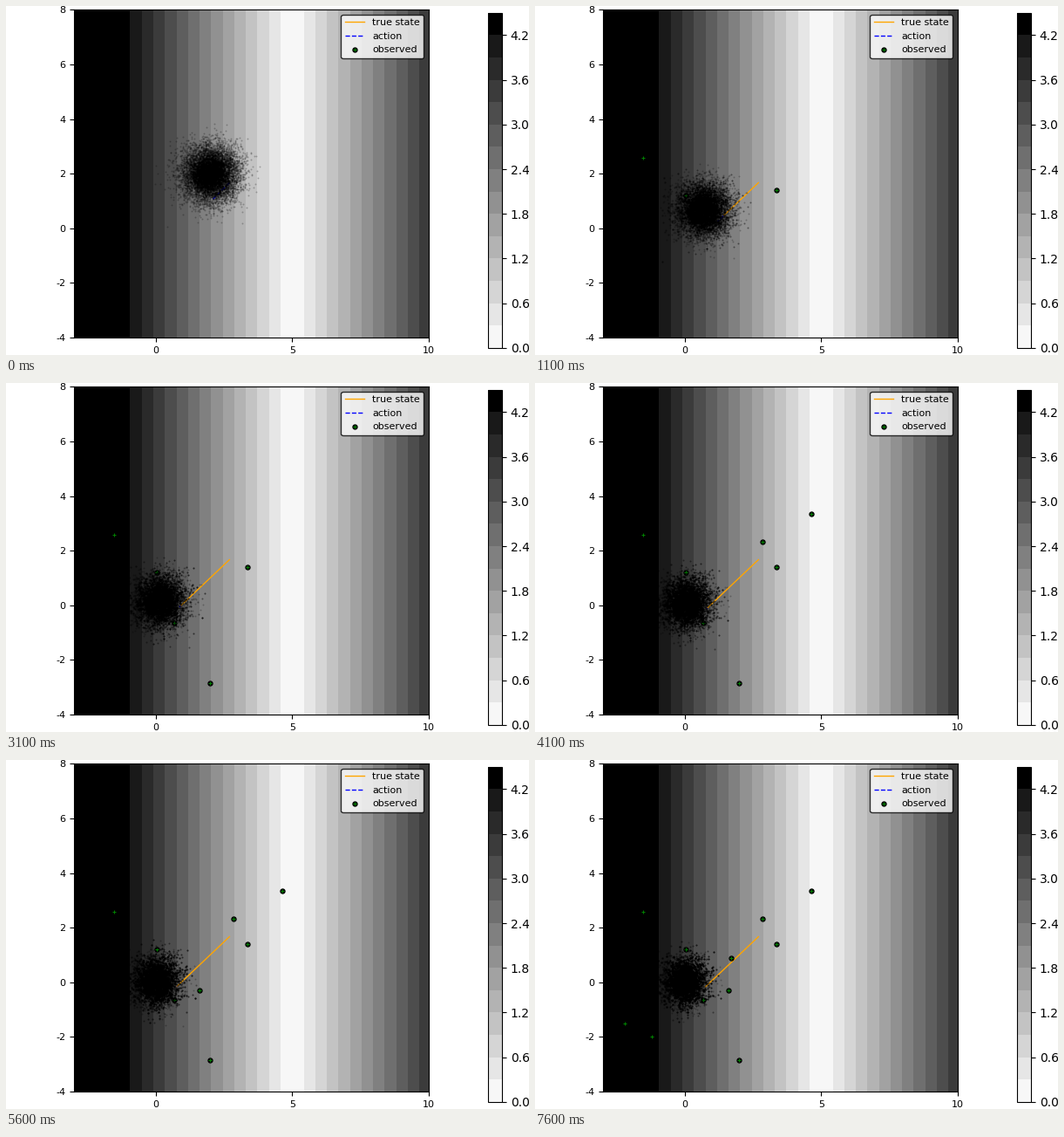
Write a matplotlib script that moves like this. It is 600 px wide and 400 px high and loops after 8000 ms.

```python
import numpy as np
import matplotlib.pyplot as plt
from matplotlib.animation import FuncAnimation

W, H, DPI = 600, 400, 100
INTERVAL, FRAMES = 100, 80
STEPS = 17
N = 10000
DECAY = 0.7

# Measurements outside the cloud, in order of arrival
OBSERVED = np.array([
    (3.37, 1.40), (-1.53, 2.58), (0.04, 1.20), (0.67, -0.65),
    (1.99, -2.86), (2.85, 2.33), (4.65, 3.34), (1.60, -0.30),
    (-1.20, -2.00), (1.70, 0.89), (-2.20, -1.50),
])


def place(left, top, right, bottom):
    """Axes rectangle from pixel edges measured from the top left."""
    return [left / W, 1 - bottom / H, (right - left) / W, (bottom - top) / H]


def particle_clouds():
    """Particles shrink toward the origin and are partly resampled each step."""
    rng = np.random.default_rng(4)
    base = rng.normal(size=(N, 2))
    clouds = []
    for n in range(STEPS):
        spread = 0.5 - n / STEPS * np.array([0.12, 0.07])
        clouds.append(2 * DECAY ** n + base * spread)
        swap = rng.random(N) < 0.12
        base[swap] = base[rng.integers(0, N, swap.sum())]
    return clouds


def seen_count(step):
    """Measurements arrive every step at first, later ones often fall in the cloud."""
    return int(np.interp(step, [0, 4, 9, 16], [0, 4, 7, 11]))


pull = 1 - DECAY ** np.arange(STEPS)
path = np.array([2.70, 1.67]) - np.outer(pull, [1.95, 1.84])
clouds = particle_clouds()

fig = plt.figure(figsize=(W / DPI, H / DPI), dpi=DPI, facecolor="white")
ax = fig.add_axes(place(78, 4.3, 484.7, 380.1))
cax = fig.add_axes(place(553, 7.9, 569, 391.7))

# Measurement noise grows with the distance from x = 5
levels = np.linspace(0, 4.5, 16)
greys = [str(1 - (i + 0.5) / 15) for i in range(14)] + ["black"]
gx, gy = np.meshgrid(np.linspace(-3, 10, 131), [-4, 8])
noise = np.minimum(np.abs(gx - 5) / np.sqrt(2), 4.49)
bands = ax.contourf(gx, gy, noise, levels=levels, colors=greys)
bar = fig.colorbar(bands, cax=cax, ticks=np.arange(0, 4.5, 0.6), format="%.1f")
bar.ax.tick_params(labelsize=10)

ax.set_xlim(-3, 10)
ax.set_ylim(-4, 8)
xticks, yticks = range(0, 11, 5), range(-4, 9, 2)
ax.set_xticks(xticks, [str(v) for v in xticks])
ax.set_yticks(yticks, [str(v) for v in yticks])
ax.tick_params(labelsize=8)

state, = ax.plot([], [], color="orange", lw=1, zorder=3)
action, = ax.plot([], [], color="blue", lw=1, ls="--", zorder=3)
discs, = ax.plot([], [], "o", color="black", ms=4.6, mew=0, zorder=4)
pluses, = ax.plot([], [], "+", color="green", ms=3, mew=0.72, zorder=4)
dots = ax.scatter([], [], s=1.8, color="black", alpha=0.25, linewidths=0, zorder=5)

legend = ax.legend([state, action, (discs, pluses)],
                   ["true state", "action", "observed"], loc="upper right",
                   fontsize=8, framealpha=0.8, edgecolor="black")
legend.set_zorder(10)


def update(frame):
    t = frame * INTERVAL
    step = 0 if t < 100 else 1 + (t - 100) // 500
    here = path[step]
    goal = here - (1 - DECAY) * 2 * DECAY ** step
    seen = OBSERVED[:seen_count(step)]
    state.set_data(*path[:step + 1].T)
    action.set_data(*np.array([here, goal]).T)
    for marks in (discs, pluses):
        marks.set_data(*seen.T)
    dots.set_offsets(clouds[step])
    return state, action, discs, pluses, dots


anim = FuncAnimation(fig, update, frames=FRAMES, interval=INTERVAL,
                     repeat=True, repeat_delay=0, blit=False)
plt.show()
```
